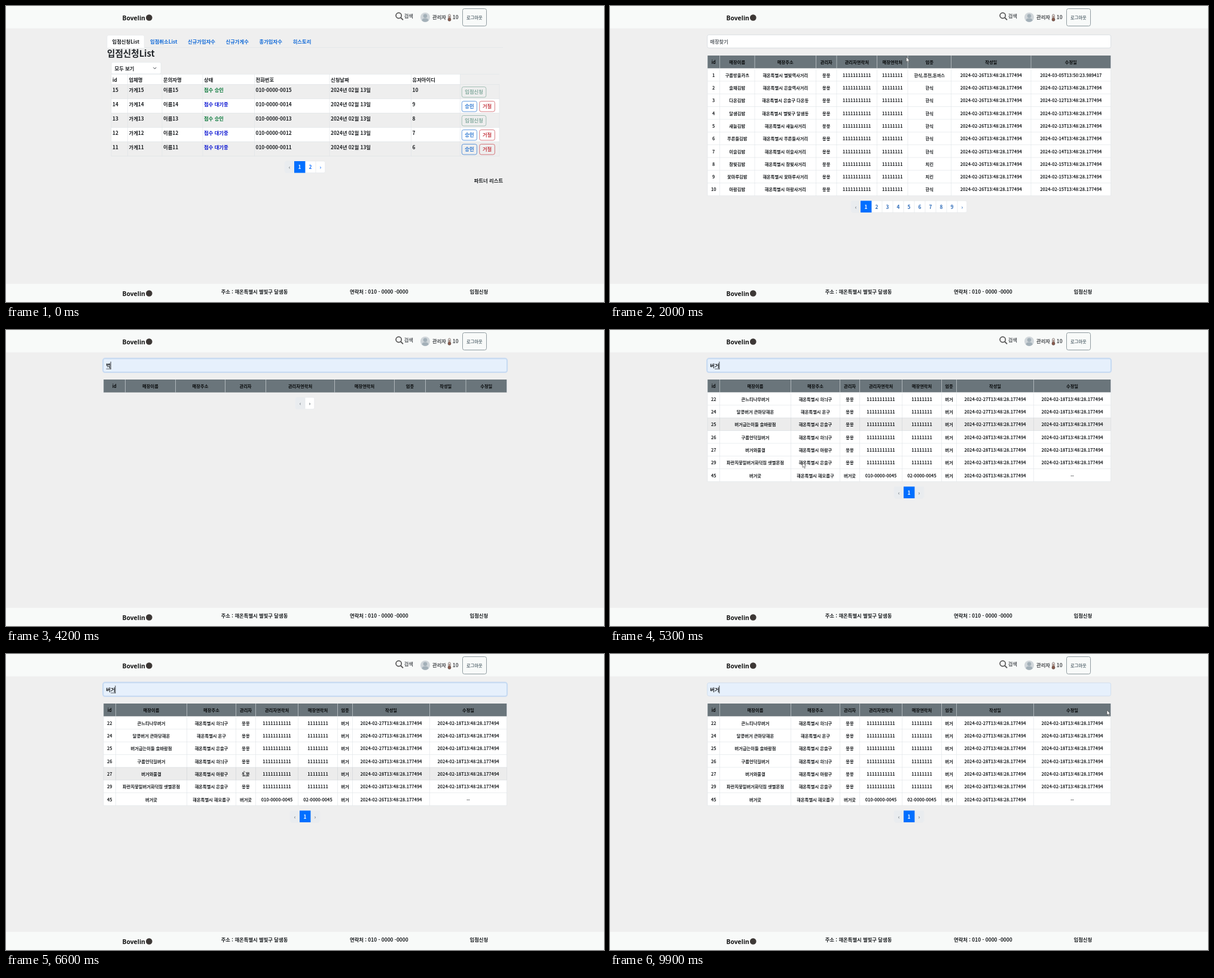
An HTML page for the animation above (10 s loop, 1000x496 px).

```html
<!DOCTYPE html>
<html lang="ko">
<head>
<meta charset="utf-8">
<title>관리자</title>
<style>
html, body { margin: 0; width: 100%; height: 100%; overflow: hidden; background: #efefef; }
svg { display: block; width: 100%; height: 100%; }
text { font-family: "Noto Sans CJK KR", "Noto Sans CJK JP", "Noto Sans CJK", sans-serif; font-weight: 700; white-space: pre; }
.brand { font-family: "Noto Sans", "Open Sans", sans-serif; font-weight: 600; }
</style>
</head>
<body>
<svg id="stage" viewBox="0 0 1000 496"></svg>
<script>
const INK = '#1c1f22', BLUE = '#0d6efd', LINE = '#dee2e6', MUTED = '#e9ecef';
const BASE = 8.33, SMALL = 7.29, ROW = 21.33, LOOP = 10000;

// Shape helpers; text is placed by its vertical centre.
const text = (x, y, s, { size = BASE, fill = INK, anchor = 'start', extra = '' } = {}) =>
  `<text x="${x}" y="${y + size * .36}" font-size="${size}" fill="${fill}" text-anchor="${anchor}" ${extra}>${s}</text>`;
const mid = (x, y, s, opt = {}) => text(x, y, s, { ...opt, anchor: 'middle' });
const rect = (x, y, w, h, fill, extra = '') =>
  `<rect x="${x}" y="${y}" width="${w}" height="${h}" fill="${fill}" ${extra}/>`;
const path = (d, stroke, width = .6, extra = '') =>
  `<path d="${d}" fill="none" stroke="${stroke}" stroke-width="${width}" ${extra}/>`;
const group = (id, body) => `<g id="${id}">${body}</g>`;

function brand(y) {
  return text(194.5, y + .7, 'Bovelin', { size: 10.4, fill: '#151515', extra: 'class="brand"' }) +
    `<circle cx="239.3" cy="${y - .5}" r="5.3" fill="#3d3836"/>`;
}

function pager(y, labels, linkFill, lastOff) {
  const width = s => isNaN(s) ? 15.7 : 18;
  const total = labels.reduce((sum, s) => sum + width(s), 0);
  let x = 500 - total / 2;
  let out = rect(x, y, total, 19.6, '#fff', `rx="2.5" stroke="${LINE}" stroke-width=".5"`), current = '';
  labels.forEach((s, i) => {
    const w = width(s), active = s === '1';
    const off = i === 0 || (lastOff && s === '›');
    if (off) out += rect(x, y, w, 19.6, MUTED, 'rx="2"');
    if (i) out += path(`M${x} ${y}v19.6`, LINE);
    if (active) current = rect(x, y, w + .4, 19.6, '#006fff') + mid(x + w / 2, y + 10.2, s, { fill: '#fff' });
    else out += mid(x + w / 2, y + 10.2, s, { fill: off ? '#6c757d' : linkFill });
    x += w;
  });
  return out + current;
}

function shell() {
  return rect(0, 0, 1000, 496, '#efefef') + rect(0, 0, 1000, 37.5, '#f8faf9') + rect(0, 465.5, 1000, 30.5, '#f8faf9') +
    brand(20) + brand(482) +
    `<circle cx="656.7" cy="16" r="4.6" fill="none" stroke="#555" stroke-width="1.7"/>` +
    path('M660 19.4l4 4', '#555', 2) +
    text(665.7, 17.5, '검색', { fill: '#5a5e62' }) +
    `<circle cx="701" cy="19" r="8" fill="#d0d6da"/><circle cx="701" cy="16.7" r="3.3" fill="#a3b0b8"/>` +
    `<path d="M695.5 24.6q0-4 5.5-4t5.5 4q-5.5 4.4-11 0z" fill="#a3b0b8"/>` +
    text(713, 19.3, '관리자', { fill: '#4a4d50' }) +
    rect(739.8, 14, 3.4, 8.5, '#fff', 'rx="1.7" stroke="#5b4a44" stroke-width=".8"') +
    `<circle cx="741.5" cy="22.8" r="2.5" fill="#8a5a4c" stroke="#5b4a44" stroke-width=".7"/>` +
    path('M741.5 16.5v5', '#8a5a4c', 1.2) +
    text(746.8, 19.5, '10', { fill: '#4a4d50' }) +
    rect(763.5, 4.5, 40, 29, 'none', 'rx="3" stroke="#75838a" stroke-width=".8"') +
    mid(783.4, 19.2, '로그아웃', { size: SMALL, fill: '#68777e' }) +
    text(359.7, 479.5, '주소 : 해온특별시 별빛구 달샘동') +
    text(575, 479.5, '연락처 : 010 - 0000 -0000') +
    text(775.5, 479.5, '입점신청');
}

function button(x, y, w, s, fill) {
  return rect(x, y, w, 17.5, 'none', `rx="3" stroke="${fill}" stroke-width=".7"`) + mid(x + w / 2, y + 9, s, { fill });
}

function requests() {
  const edges = [176, 203.5, 261, 329, 415.5, 541, 677.5, 759.5, 825];
  let out = path('M169 69.6H831', LINE) +
    `<path d="M169 70V51.5q0-2.5 2.5-2.5h57.2q2.5 0 2.5 2.5V70z" fill="#fff" stroke="${LINE}" stroke-width=".5"/>` +
    rect(169.4, 69, 61.4, 1.2, '#fff') + text(177.5, 59.8, '입점신청List');
  [[241, '입점취소List'], [304, '신규가입자수'], [367.5, '신규가게수'], [423.5, '총가입자수'], [479.7, '히스토리']]
    .forEach(([x, s]) => out += text(x, 59.8, s, { fill: '#116ad8' }));
  out += text(169, 79.7, '입점신청List', { size: 14.58, fill: '#212529' }) +
    rect(176.2, 94.3, 83, 19.5, '#fff', `rx="2.5" stroke="${LINE}" stroke-width=".6"`) +
    text(181.5, 104.6, '모두 보기') + path('M246.3 102.8l2.5 2.5 2.5-2.5', '#343a40', 1) +
    rect(176, 114.3, 583.5, 17.2, '#fff');
  ['id', '업체명', '문의자명', '상태', '전화번호', '신청날짜', '유저아이디']
    .forEach((s, i) => out += text(edges[i] + 2, 123.7, s));
  for (let r = 0; r < 5; r++) {
    const y = 131.5 + 24 * r, n = 15 - r, done = r === 0 || r === 2;
    out += rect(176, y, 649, 24, r % 2 ? '#fff' : '#eee');
    const cells = [n, '가게' + n, '이름' + n, done ? '접수 승인' : '접수 대기중', '010-0000-00' + n, '2024년 02월 13일', n - 5];
    cells.forEach((s, i) => out += text(edges[i] + 2, y + 9.4, s, { fill: i === 3 ? (done ? '#0c7a3c' : '#0a14d2') : INK }));
    out += done ? button(762.3, y + 4, 40.5, '입점신청', '#86aca0')
      : button(762.3, y + 4, 25.2, '승인', '#2472cf') + button(791.8, y + 4, 25.6, '거절', '#c8434b');
  }
  for (let r = 0; r < 7; r++) out += path(`M176 ${r ? 107.5 + 24 * r : 114.3}H825`, LINE);
  edges.forEach((x, i) => out += path(`M${x} ${i > 7 ? 131.5 : 114.3}V251.5`, LINE));
  return out + pager(260, ['‹', '1', '2', '›'], BLUE) + text(782.8, 293, '파트너 리스트') +
    group('linkLine', path('M783 298H831', INK, .6));
}

function table(edges, rows) {
  const bottom = 104.6 + rows.length * ROW;
  const centre = i => (edges[i] + edges[i + 1]) / 2;
  let out = rect(163, 83, 674.5, 21.6, '#6a757b') + rect(163, 104.6, 674.5, bottom - 104.6, '#fff');
  ['id', '매장이름', '매장주소', '관리자', '관리자연락처', '매장연락처', '업종', '작성일', '수정일']
    .forEach((s, i) => out += mid(centre(i), 94.6, s, { size: SMALL, fill: '#080a0b' }));
  rows.forEach((row, r) => {
    const y = 104.6 + ROW * r;
    row.forEach((s, i) => out += mid(centre(i), y + 11.3, s, { size: SMALL }));
    out += path(`M163 ${y + ROW}H837.5`, LINE);
  });
  edges.forEach(x => out += path(`M${x} 83V${bottom}`, LINE));
  return out;
}

const CITY = '해온특별시 ', CLOCK = 'T13:48:28.177494';
const feb = d => '2024-02-' + d + CLOCK;
const store = (id, name, place, kind, made, edited) =>
  [id, name, CITY + place, '몽몽', '11111111111', '11111111', kind, feb(made), edited];

const allStores = [
  ['구름방울카츠', '별빛역사거리'], ['솔채김밥', '은솔역사거리'], ['다온김밥', '은솔구 다온동'],
  ['달샘김밥', '별빛구 달샘동'], ['새늘김밥', '새늘사거리'], ['푸른들김밥', '푸른들사거리'],
  ['이슬김밥', '이슬사거리'], ['참빛김밥', '참빛사거리'], ['꽃마루김밥', '꽃마루사거리'], ['아람김밥', '아람사거리']
].map(([name, place], i) => store(i + 1, name, place,
  i === 0 ? '한식,퓨전,돈까스' : i === 7 || i === 8 ? '치킨' : '한식', 26,
  i ? feb([12, 12, 13, 13, 14, 14, 15, 15, 15][i - 1]) : '2024-03-05T13:50:23.989417'));

const found = [
  [22, '큰느티나무버거', '하늬구', 27], [24, '달콩버거 큰마당해온', '온구', 27],
  [25, '버거굽는이들 솔바람점', '은솔구', 27], [26, '구름언덕길버거', '하늬구', 28],
  [27, '버거와물결', '아람구', 28], [29, '파란지붕밑버거화덕집 샛별본점', '은솔구', 28]
].map(([id, name, place, day]) => store(id, name, place, '버거', day, feb(18)));
found.push([45, '버거곶', CITY + '해오름구', '버거곶', '010-0000-0045', '02-0000-0045', '버거', feb(26), '--']);

const LINK = '#2d6bb8';
const views = {
  empty: table([163, 199.5, 283.5, 366.5, 434.5, 549.5, 649.5, 701.5, 769, 837.5], []) + pager(113, ['‹', '›'], '#46525c'),
  all: table([163, 183.5, 242, 344.5, 379, 446.5, 498, 570.5, 704, 837.5], allStores) +
    pager(326.4, ['‹', ...'123456789', '›'], LINK),
  found: table([163, 183.5, 302.5, 384.5, 417.5, 488.5, 554.5, 579.5, 708.5, 837.5], found) +
    pager(262.4, ['‹', '1', '›'], LINK, true)
};
const rowCount = { empty: 0, all: 10, found: 7 };

const cursors = {
  arrow: '<path d="M0 0V8.3L1.9 6.6 3.2 9.7 4.5 9.1 3.2 6.2H5.6z" fill="#fff" stroke="#444" stroke-width=".6"/>',
  hand: '<path d="M-1.3 1q0-1 .9-1t.9 1V4l4 1q1 .3 .8 1.5L4.5 11.5H-.5L-4 7.5q-.6-1.2 .6-1.2L-1.3 7.5z" fill="#fff" stroke="#222" stroke-width=".7"/>',
  beam: '<path d="M0 0H1.8L2.5.6 3.2 0H5M2.5.6V10.4M0 11H1.8l.7-.6.7.6H5" fill="none" stroke="#222" stroke-width=".8"/>'
};

document.getElementById('stage').innerHTML = shell() + group('requests', requests()) +
  group('search',
    rect(162, 47.5, 676.2, 23.6, 'none', 'id="glow" rx="3.5" stroke="#0d6efd" stroke-opacity=".15" stroke-width="1.8"') +
    rect(162.7, 48.3, 674.8, 22, '#fff', 'id="field" rx="2.8" stroke-width=".7"') +
    text(167.3, 60, '', { extra: 'id="typed"' }) +
    path('M0 65.2h7.7', INK, .7, 'id="under"') + path('M0 53V66', '#111', .8, 'id="caret"')) +
  Object.keys(views).map(k => group(k, views[k])).join('') +
  rect(163, 0, 674.5, ROW, '#000', 'id="hover" fill-opacity=".075"') +
  Object.keys(cursors).map(k => group(k, cursors[k])).join('');

const $ = id => document.getElementById(id);
const show = (id, on) => $(id).style.display = on ? '' : 'none';

// Pointer waypoints: time, x, y, shape.
const pointer = [
  [0], [200, 948, 274, 'arrow'], [400, 948, 274, 'arrow'], [500, 930, 283, 'arrow'], [700, 850, 303, 'arrow'],
  [900, 819, 294.5, 'hand'], [1300, 819, 294.5, 'hand'], [1400, 815, 285, 'arrow'], [1900, 512, 95, 'arrow'],
  [2000, 495.5, 85.5, 'arrow'], [2300, 277, 42, 'beam'], [2600, 232, 47, 'beam'], [3900],
  [5100, 240, 110, 'arrow'], [5300, 322, 222, 'arrow'], [5400, 330, 229, 'arrow'], [5600, 330, 229, 'arrow'],
  [5700, 400, 262, 'arrow'], [6000, 459.5, 291, 'arrow'], [6200, 456, 313, 'arrow'], [6500, 400, 202, 'arrow'],
  [6600, 398, 196, 'arrow'], [7400, 398, 196, 'arrow'], [7500, 398, 178, 'arrow'], [7600, 396.5, 157.5, 'arrow'],
  [7700, 560, 100, 'arrow'], [7900, 860, 18, 'arrow'], [8000, 953, -5, 'arrow'], [9800, 953, -5, 'arrow'],
  [9900, 831, 94, 'arrow']
];
const typing = [[0, ''], [3900, 'ㅂ'], [4100, '버'], [4200, '벅'], [4300, '버거']];
const stages = [[0, ''], [1300, 'empty'], [1400, 'all'], [4000, 'empty'], [4300, 'found']];
const caretOn = [[2800, 3300], [3900, 4800], [5300, 5800], [6300, 6900], [7500, 8000], [8500, 8700], [9900, LOOP]];

const lastIndex = (steps, t) => steps.findLastIndex(s => s[0] <= t);
const at = (steps, t) => steps[lastIndex(steps, t)][1];

function pointerAt(t) {
  const i = lastIndex(pointer, t), a = pointer[i], b = pointer[i + 1];
  if (!a || !a[3]) return null;
  if (!b || !b[3]) return { x: a[1], y: a[2], shape: a[3] };
  const k = (t - a[0]) / (b[0] - a[0]);
  return { x: a[1] + (b[1] - a[1]) * k, y: a[2] + (b[2] - a[2]) * k, shape: a[3] };
}

function draw(t) {
  const view = at(stages, t), word = at(typing, t);
  show('requests', !view);
  show('search', view);
  for (const k in views) show(k, k === view);
  show('linkLine', t >= 900);

  const focus = Math.max(0, Math.min(1, (t - 2700) / 300, (8800 - t) / 200));
  $('glow').style.opacity = focus;
  $('field').setAttribute('fill', t >= 2800 ? '#e6f0fc' : '#fff');
  $('field').setAttribute('stroke', focus > .4 ? '#b4d2f0' : t >= 2800 ? '#c9d9ea' : '#ced4da');
  $('typed').textContent = word || '매장찾기';
  $('typed').setAttribute('fill', word ? INK : '#666b70');
  const end = 167.5 + word.length * 7.67;
  show('under', word && t < 9000);
  $('under').setAttribute('transform', `translate(${end - 7.67} 0)`);
  show('caret', caretOn.some(([a, b]) => t >= a && t < b));
  $('caret').setAttribute('transform', `translate(${end} 0)`);

  // Row highlight trails the pointer by one step.
  const trail = pointerAt(t - 100);
  const row = trail && view ? Math.floor((trail.y - 104.6) / ROW) : -1;
  show('hover', row >= 0 && row < rowCount[view]);
  $('hover').setAttribute('y', 104.6 + row * ROW);

  const p = pointerAt(t);
  for (const k in cursors) show(k, p && p.shape === k);
  if (p) $(p.shape).setAttribute('transform', `translate(${p.x} ${p.y})`);
}

const start = performance.now();
function tick() {
  const t = (performance.now() - start) % LOOP;
  draw(Math.floor(t / 100) * 100);
  requestAnimationFrame(tick);
}
tick();
</script>
</body>
</html>
```
